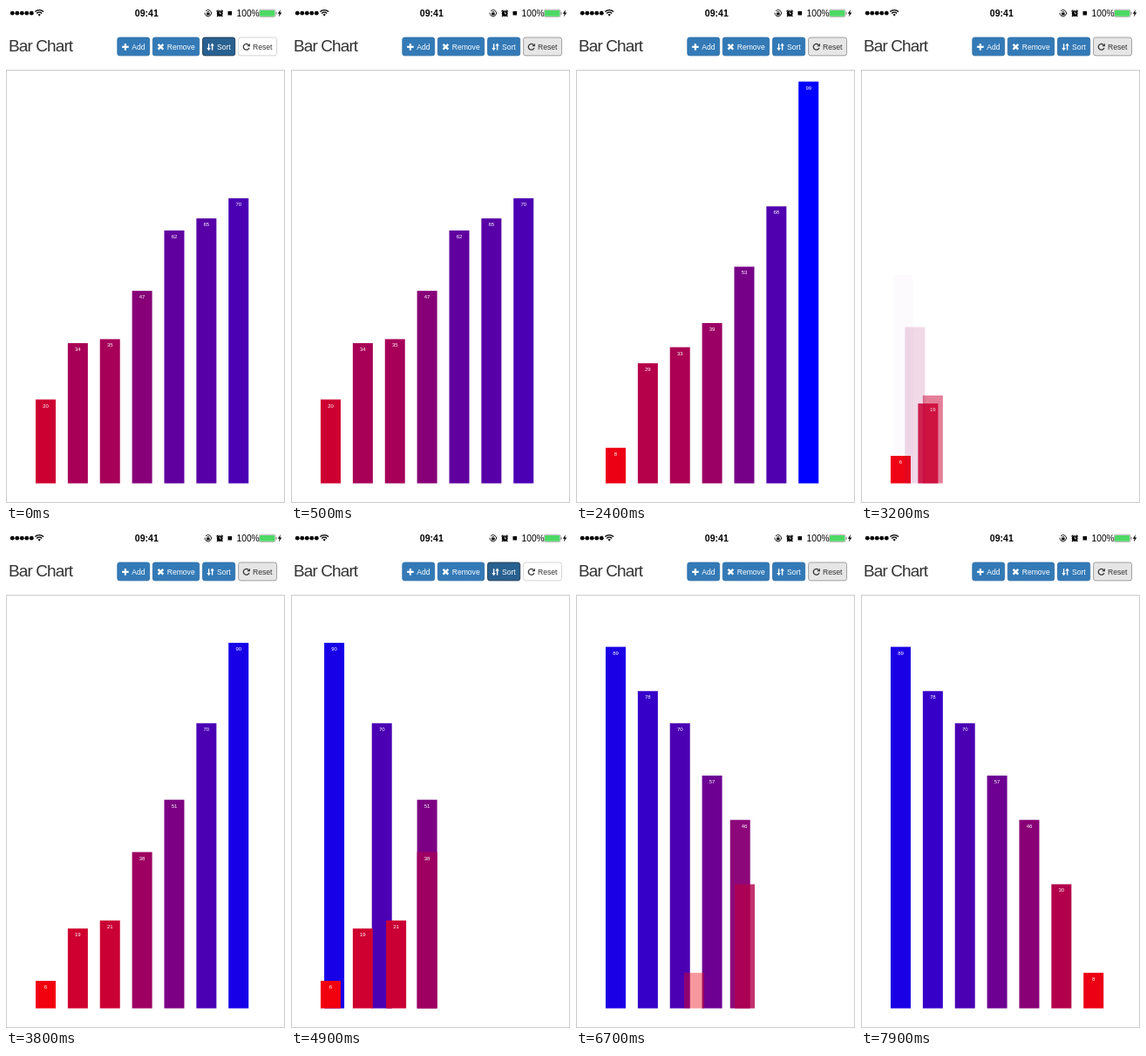
Recreate the animation shown at these times as an HTML page with a canvas. Size 320 px wide and 569 px high, loop 8 s.

```html
<!DOCTYPE html>
<html lang="en">
<head>
<meta charset="utf-8">
<title>Bar Chart</title>
<style>
  html, body { margin: 0; width: 100%; height: 100%; overflow: hidden; background: #fff; }
  canvas { display: block; width: 320px; height: 569px; }
</style>
</head>
<body>
<canvas id="stage"></canvas>
<script>
const W = 320, H = 569, LOOP = 8000, TICK = 100;
const SLIDE = 300, STAGGER = 50, FADE = 250;
const LEFT = 34, STEP = 36.87, BAR = 23, BASE = 546.5;
const FONT = '"Liberation Sans", Arial, sans-serif';

// Each action starts a new chart state; "sort" keeps the data and reorders it.
const actions = [
  { at: -2000, kind: 'sort', data: [20, 34, 35, 47, 62, 65, 70] },
  { at: 500, kind: 'reset', data: [8, 29, 33, 39, 53, 68, 99] },
  { at: 2950, kind: 'reset', data: [6, 19, 21, 38, 51, 70, 90] },
  { at: 4650, kind: 'sort', data: [90, 70, 51, 38, 21, 19, 6] },
  { at: 6260, kind: 'reset', data: [89, 78, 70, 57, 46, 30, 8] }
];

const buttons = [
  { label: 'Add', x: 127.5, w: 37.5, icon: plus },
  { label: 'Remove', x: 168, w: 54, icon: cross },
  { label: 'Sort', x: 225.2, w: 37.8, icon: arrows },
  { label: 'Reset', x: 266.3, w: 44.5, icon: refresh, light: true }
];

const canvas = document.getElementById('stage');
const ctx = canvas.getContext('2d');
const ratio = window.devicePixelRatio || 1;
canvas.width = W * ratio;
canvas.height = H * ratio;

const clamp = v => Math.max(0, Math.min(1, v));
const ease = t => t < 0.5 ? 4 * t ** 3 : 1 - 4 * (1 - t) ** 3;
const homeX = i => LEFT + i * STEP;
const barHeight = v => 3.86 + 4.607 * v;

function barColor(v) {
  const k = clamp((v - 0.5) / 98.5);
  return `rgb(${Math.round(255 * (1 - k))},0,${Math.round(255 * k)})`;
}

function text(str, x, y, size, color, align = 'left', weight = 'normal', spacing = 0) {
  ctx.font = `${weight} ${size}px ${FONT}`;
  ctx.letterSpacing = spacing + 'px';
  ctx.textAlign = align;
  ctx.fillStyle = color;
  ctx.fillText(str, x, y);
}

function dot(x, y, r) {
  ctx.beginPath();
  ctx.arc(x, y, r, 0, Math.PI * 2);
  ctx.fill();
}

function ring(x, y, r, from = 0, to = Math.PI * 2) {
  ctx.beginPath();
  ctx.arc(x, y, r, from, to);
  ctx.stroke();
}

function line(...p) {
  ctx.beginPath();
  for (let i = 0; i < p.length; i += 2) ctx.lineTo(p[i], p[i + 1]);
  ctx.stroke();
}

function poly(...p) {
  ctx.beginPath();
  for (let i = 0; i < p.length; i += 2) ctx.lineTo(p[i], p[i + 1]);
  ctx.fill();
}

function box(x, y, w, h, r) {
  ctx.beginPath();
  ctx.roundRect(x, y, w, h, r);
}

// Button icons, drawn around the origin
function plus() {
  ctx.lineWidth = 2.2;
  line(-3.8, 0, 3.8, 0);
  line(0, -3.8, 0, 3.8);
}

function cross() {
  ctx.lineWidth = 2.4;
  line(-2.9, -2.9, 2.9, 2.9);
  line(-2.9, 2.9, 2.9, -2.9);
}

function arrows() {
  ctx.lineWidth = 1.4;
  line(-2, -3.6, -2, 2);
  line(2, -2, 2, 3.8);
  poly(-4.2, 1.3, 0.2, 1.3, -2, 4.4);
  poly(-0.2, -1.3, 4.2, -1.3, 2, -4.4);
}

function refresh() {
  ctx.lineWidth = 1.3;
  ring(0, 0, 3.4, 0.35, 5.5);
  poly(4.2, -4.1, 4.2, -0.5, 0.6, -0.5);
}

function drawStatus() {
  ctx.fillStyle = ctx.strokeStyle = '#000';
  for (let i = 0; i < 5; i++) dot(7.3 + i * 5.5, 8.2, 2.4);

  ctx.lineWidth = 1.4;
  for (const r of [4.2, 6.8]) ring(38.2, 11.4, r, -2.36, -0.78);
  ctx.beginPath();
  ctx.moveTo(38.2, 11.8);
  ctx.arc(38.2, 11.4, 2.2, -2.36, -0.78);
  ctx.fill();

  text('09:41', 161.3, 12, 10.6, '#000', 'center', 'bold');

  // rotation lock
  ctx.strokeStyle = '#000';
  ctx.lineWidth = 0.9;
  ring(231.8, 8.2, 3.7, -2.4, 3.3);
  ctx.fillRect(230, 7.8, 3.6, 2.6);
  ring(231.8, 7.6, 1.1, Math.PI, 0);

  // alarm clock
  dot(245.2, 8.6, 3.4);
  ctx.lineWidth = 1.2;
  line(241.4, 6.4, 243.4, 4.6);
  line(247, 4.6, 249, 6.4);
  line(243, 11, 242, 12.2);
  line(247.4, 11, 248.4, 12.2);
  ctx.strokeStyle = '#fff';
  ctx.lineWidth = 0.8;
  line(245.2, 6.5, 245.2, 8.8, 247, 8.8);

  ctx.fillStyle = '#000';
  ctx.fillRect(254.5, 6, 4.5, 4.5);

  text('100%', 264.6, 12, 10.2, '#000');

  ctx.strokeStyle = '#777';
  ctx.lineWidth = 0.6;
  box(290.3, 4.2, 18.6, 8.2, 1.6);
  ctx.stroke();
  ctx.fillStyle = '#4cd964';
  box(291, 4.9, 17.2, 6.8, 1);
  ctx.fill();
  ctx.fillStyle = '#777';
  ctx.fillRect(309.5, 6.9, 1, 2.8);
  ctx.fillStyle = '#000';
  poly(315, 4, 311.8, 8.8, 313.7, 8.8, 312.9, 12.4, 316.2, 7.4, 314.2, 7.4);
}

function drawButton(b, focused) {
  const [fill, edge] = b.light
    ? (focused ? ['#e6e6e6', '#8c8c8c'] : ['#fff', '#ccc'])
    : (focused ? ['#286090', '#122b40'] : ['#337ab7', '#2e6da4']);
  const ink = b.light ? '#333' : '#fff';
  ctx.fillStyle = fill;
  ctx.strokeStyle = edge;
  ctx.lineWidth = 0.8;
  box(b.x + 0.3, 36, b.w - 0.6, 20.8, 2.5);
  ctx.fill();
  ctx.stroke();

  ctx.save();
  ctx.translate(b.x + 9.4, 46.8);
  ctx.fillStyle = ctx.strokeStyle = ink;
  b.icon();
  ctx.restore();
  text(b.label, b.x + 16.7, 50, 8.6, ink);
}

function drawBars(bars) {
  for (const b of bars) {
    ctx.globalAlpha = b.alpha;
    ctx.fillStyle = barColor(b.v);
    ctx.fillRect(b.x, BASE - barHeight(b.v), BAR, barHeight(b.v));
  }
  for (const b of bars) {
    ctx.globalAlpha = b.alpha;
    text(b.v, b.labelX + BAR / 2, BASE - barHeight(b.v) + 9, 6, '#fff', 'center');
  }
  ctx.globalAlpha = 1;
}

function drawChart(t, now, before) {
  const since = t - now.at;
  const progress = i => ease(clamp((since - i * STAGGER) / SLIDE));

  if (now.kind === 'reset') {
    const alpha = 1 - ease(clamp(since / FADE));
    if (alpha > 0) {
      drawBars(before.data.map((v, i) => ({ v, x: homeX(i), labelX: homeX(i), alpha })));
    }
    // new bars slide out of the first slot, labels wait in place
    drawBars(now.data.map((v, i) => {
      const k = progress(i);
      return { v, x: LEFT + i * STEP * k, labelX: homeX(i), alpha: k };
    }));
  } else {
    drawBars(now.data.map((v, i) => {
      const from = before ? before.data.indexOf(v) : i;
      const x = homeX(from + (i - from) * progress(i));
      return { v, x, labelX: x, alpha: 1 };
    }));
  }
}

function draw(t) {
  ctx.setTransform(ratio, 0, 0, ratio, 0, 0);
  ctx.fillStyle = '#fff';
  ctx.fillRect(0, 0, W, H);

  let n = 0;
  while (n + 1 < actions.length && actions[n + 1].at <= t) n++;
  const now = actions[n];

  drawStatus();
  text('Bar Chart', 3, 52.3, 19, '#333', 'left', 'normal', -0.9);
  for (const b of buttons) drawButton(b, b.label.toLowerCase() === now.kind);

  ctx.strokeStyle = '#ccc';
  ctx.lineWidth = 1;
  ctx.strokeRect(0.5, 73.5, W - 1, H - 74);
  drawChart(t, now, actions[n - 1]);
}

const start = performance.now();
function frame() {
  const t = (performance.now() - start) % LOOP;
  draw(Math.floor(t / TICK) * TICK);
  requestAnimationFrame(frame);
}
frame();
</script>
</body>
</html>
```
